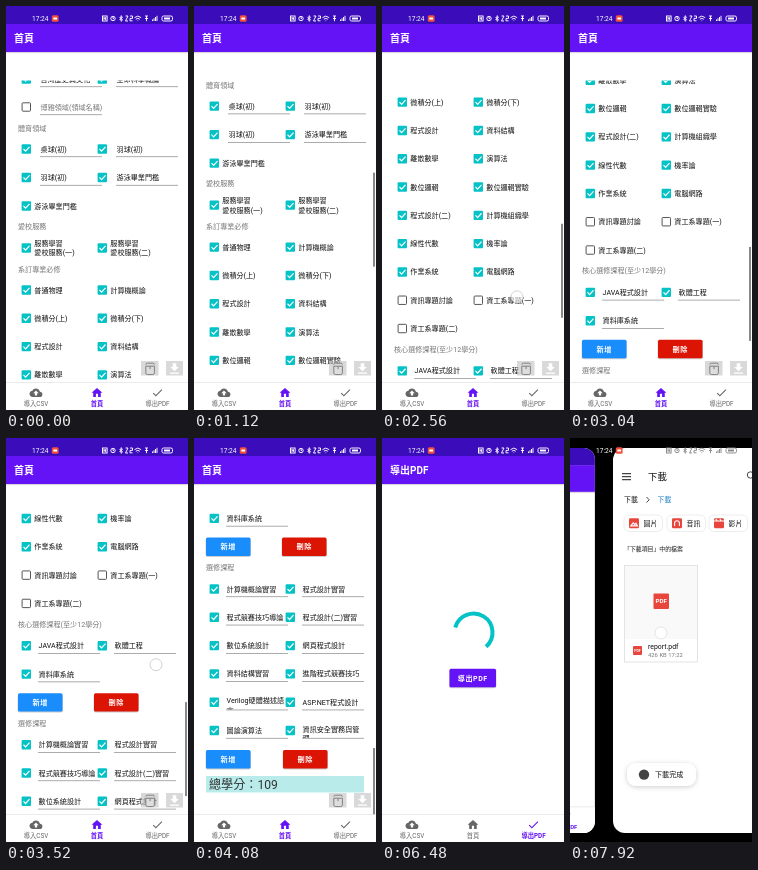
An HTML page that plays this animation: 182 by 404 pixels, repeating every 8000 ms.

```html
<!DOCTYPE html>
<html lang="zh-Hant">
<head>
<meta charset="utf-8">
<title>學分計算</title>
<style>
html, body { margin: 0; width: 100%; height: 100%; overflow: hidden; background: #000; }
svg { display: block; width: 100%; height: 100%; }
text { font-family: Roboto, "Noto Sans CJK TC", "Noto Sans CJK", sans-serif; white-space: pre; }
</style>
</head>
<body>
<svg id="stage" viewBox="0 0 182 404"></svg>
<script>
const TEAL = '#04c2c6', PURPLE = '#6412f6', GREY = '#666';
const LOOP = 8000, TAB_AT = 4400, LOAD_AT = 5500, LOADED_AT = 7080, SWITCH_AT = 7400, SWITCH_END = 7920;

const rect = (x, y, w, h, fill, extra = '') =>
  `<rect x="${x}" y="${y}" width="${w}" height="${h}" fill="${fill}" ${extra}/>`;
const path = (d, extra = '') => `<path d="${d}" ${extra}/>`;
const stroke = (color, width = 1) => `fill="none" stroke="${color}" stroke-width="${width}"`;
// y is the vertical middle of the line
const text = (x, y, s, size = 7.1, fill = '#111', extra = '') =>
  `<text x="${x}" y="${y + size * .36}" font-size="${size}" fill="${fill}" ${extra}>${s}</text>`;
const MID = 'text-anchor="middle"', BOLD = 'font-weight="700"';

// ---- course list, y measured from the first scroll position ----
function box(x, y, on) {
  return on
    ? rect(x - 4.4, y - 4.7, 9.4, 9.4, TEAL, 'rx="1"') + path(`M${x - 2.5} ${y}l2.1 2.2 3.9-4.3`, stroke('#fff', 1.2))
    : rect(x - 3.9, y - 4.2, 8.4, 8.4, '#fff', 'rx=".8" stroke="#555" stroke-width="1"');
}
function row(y, names, on = true) {
  return names.map((name, i) => {
    const x = 20 + 76 * i, lines = name.split('/');
    const shift = lines.length > 1 ? 4.7 : 0;
    return box(x, y, on) + lines.map((s, k) => text(x + 8.3, y - shift + k * 9.6, s)).join('');
  }).join('');
}
function field(y, names, inset = 12, on = true) {
  return names.map((name, i) => {
    const x = 20 + 76 * i, left = x + inset, [first, rest] = name.split('/');
    return box(x, y, on)
      + text(left + .6, y - (rest ? 1.5 : 0), first, 7.1, on ? '#111' : '#777')
      + (rest ? `<svg x="${left}" y="${y + 3}" width="62" height="4.6">${text(.6, 5, rest)}</svg>` : '')
      + rect(left, y + 7.4, 62, .7, '#888');
  }).join('');
}
const heading = (y, s) => text(12, y, s, 7.1, '#777');
const button = (x, y, w, fill, s, size) =>
  rect(x - .4, y - 8.5, w + .8, 18.7, '#000', 'rx="2" opacity=".2"') + rect(x, y - 9.2, w, 18.4, fill, 'rx="1.5"')
  + text(x + w / 2, y, s, size, '#fff', `${MID} ${BOLD} letter-spacing=".5"`);
const buttons = (y, x = 88) => button(12, y, 44.5, '#1a8dfc', '新增', 7.2) + button(x, y, 44.5, '#dc1404', '刪除', 7.2);

const list = [
  field(73, ['台灣歷史與文化', '生命科學概論'], 14),
  field(101, ['博雅領域(領域名稱)'], 14, false),
  heading(122, '體育領域'),
  field(143, ['桌球(初)', '羽球(初)'], 14),
  field(171.5, ['羽球(初)', '游泳畢業門檻'], 14),
  row(200, ['游泳畢業門檻']),
  heading(220.5, '愛校服務'),
  row(242, ['服務學習/愛校服務(一)', '服務學習/愛校服務(二)']),
  heading(263, '系訂專業必修'),
  ...[['普通物理', '計算機概論'], ['微積分(上)', '微積分(下)'], ['程式設計', '資料結構'],
    ['離散數學', '演算法'], ['數位邏輯', '數位邏輯實驗'], ['程式設計(二)', '計算機組織學'],
    ['線性代數', '機率論'], ['作業系統', '電腦網路'], ['資訊專題討論', '資工系專題(一)'],
    ['資工系專題(二)']].map((names, i) => row(284 + 28.3 * i, names, i < 8)),
  heading(559.5, '核心選修課程(至少12學分)'),
  field(581, ['JAVA程式設計', '軟體工程']),
  field(609.4, ['資料庫系統']),
  buttons(637.7),
  heading(658.8, '選修課程'),
  ...[['計算機概論實習', '程式設計實習'], ['程式競賽技巧導論', '程式設計(二)實習'],
    ['數位系統設計', '網頁程式設計'], ['資料結構實習', '進階程式競賽技巧'],
    ['Verilog硬體描述語/言', 'ASP.NET程式設計'], ['圖論演算法', '資訊安全實務與管/理']
  ].map((names, i) => field(680 + 28.3 * i, names)),
  buttons(850.3, 89),
  rect(12, 867, 158, 16.5, '#b9ebeb'),
  text(15, 875.3, '總學分：109', 12.1, '#333')
].join('');

// ---- fixed parts ----
const floating =
  rect(135, 355, 17.5, 14.5, '#bbb', 'opacity=".55"') + rect(160, 355, 17, 14.5, '#bbb', 'opacity=".55"')
  + path('M139.8 360.2h8.6v6.6q0 1.8-1.8 1.8h-5q-1.8 0-1.8-1.8zM139.8 358.6q0-1.4 1.6-1.4h5.4q1.6 0 1.6 1.4M144.1 360.5v2.6',
    'fill="#ddd" stroke="#777" stroke-width=".9"')
  + path('M166.7 357.2h3.6v3.8h2.4l-4.2 4.2-4.2-4.2h2.4zM164 366.4h9v1.4h-9z', 'fill="#fff"');

const NAV = [
  [30, '導入CSV', 'M19.35 10.04C18.67 6.59 15.64 4 12 4 9.11 4 6.6 5.64 5.35 8.04 2.34 8.36 0 10.91 0 14c0 3.31 2.69 6 6 6h13c2.76 0 5-2.24 5-5 0-2.64-2.05-4.78-4.65-4.96zM14 13v4h-4v-4H7l5-5 5 5h-3z'],
  [91, '首頁', 'M10 20v-6h4v6h5v-8h3L12 3 2 12h3v8z'],
  [151.5, '導出PDF', 'M9 16.17L4.83 12l-1.42 1.41L9 19 21 7l-1.41-1.41z']
];
const nav = active => rect(0, 376.5, 182, 27.5, '#fff') + rect(0, 376.3, 182, .6, '#ddd')
  + NAV.map(([x, s, d], i) => {
    const fill = i === active ? PURPLE : GREY;
    return path(d, `fill="${fill}" transform="translate(${x - 6.5} 380.3) scale(.54)"`)
      + text(x, 398, s, 6.3, fill, `${MID} ${i === active ? BOLD : ''}`);
  }).join('');
const page = (id, title, active, body) => `<g id="${id}">${body}${nav(active)}
  ${rect(0, 46, 182, 1.2, '#000', 'opacity=".15"')}${rect(0, 0, 182, 18.3, '#3b0cba')}
  ${rect(0, 18, 182, 28, PURPLE)}${text(8, 32.5, title, 10, '#fff', BOLD)}</g>`;

const statusIcons = `<g id="icons" fill="none" stroke-width=".95">
  <rect x="96.5" y="10" width="4.6" height="5"/><path d="M98 13.8v-2.4l1.6 2.2v-2.4"/>
  <circle cx="107" cy="12.5" r="2.2"/><path d="M107 11v1.6h1M113.5 11l3 3-1.5 1.3V9.7l1.5 1.3-3 3"/>
  <path d="M119.5 10h2.5l-2.5 5h2.5M124 10h2.5v2.4H124v2.4h2.5M128.5 11.6q3.3-3 6.6 0M129.8 13.2q2-1.6 4 0M131.8 14.5v.6"/>
  <path d="M139 10h3M140.5 10v5.2M139 12.5h3M146.5 15v-1.5M148 15v-2.7M149.5 15v-4M151 15v-5.2"/>
  <rect x="156" y="10" width="10.5" height="5" rx="1.6"/><path d="M158 12.5h6" stroke-width="2"/></g>`;

// ---- downloads screen, placed at its resting position ----
const RED = '#e8453c';
const chip = (x, s, glyph) => rect(x, 77, 38.5, 16.5, '#fff', 'rx="5" stroke="#e6e6e6" stroke-width=".7"')
  + rect(x + 5, 80.3, 10, 10, RED, 'rx="1.3"') + path(`M${x + 10} 85.3${glyph}`, stroke('#fff', 1.1))
  + text(x + 19.5, 85.3, s, 6.9);
const pdfIcon = (x, y, size) => rect(x, y, size, size, RED, 'rx="1"')
  + text(x + size / 2, y + size / 2, 'PDF', size * .4, '#fff', `${MID} ${BOLD}`);
const files = rect(43, 10, 174, 385, '#fff', 'rx="12"')
  + path('M52 35.6h9M52 38.6h9M52 41.6h9', stroke('#444', 1.1))
  + text(78, 38.3, '下載', 9.4)
  + `<circle cx="180.5" cy="37" r="3.2" ${stroke('#444', 1)}/>` + path('M183 39.5l3 3', stroke('#444', 1))
  + text(54, 61.8, '下載', 6.9) + path('M76.5 59l2.7 2.8-2.7 2.8', stroke('#444', 1))
  + text(87.5, 61.8, '下載', 6.9, '#1b7fc4')
  + chip(54, '圖片', 'm-3.2 2.6l2.4-3 1.6 1.8 1.2-1.4 1.6 2.6z') + chip(97, '音訊', 'm-2.4 2.8v-3a2.4 2.4 0 0 1 4.8 0v3')
  + chip(139, '影片', 'm-5-2.3h10m-8-2l1 2m3-2l1 2')
  + text(54, 110.8, '「下載項目」中的檔案', 5.9)
  + rect(54.5, 127.5, 73, 96.5, '#fff', 'stroke="#ddd" stroke-width=".8"') + rect(55, 128, 72, 73, '#f9f9f9')
  + pdfIcon(83.5, 155.5, 15.5) + pdfIcon(63, 208, 9)
  + text(78, 209, 'report.pdf', 6.9) + text(78, 217.3, '426 KB 17:22', 5.9, '#777')
  + `<circle cx="91" cy="195" r="6" fill="#fff" stroke="#ddd" stroke-width=".8"/>`;

const $ = id => document.getElementById(id);
$('stage').innerHTML = `
<defs>
  <clipPath id="card"><rect id="corner" width="182" height="404"/></clipPath>
  <clipPath id="view"><rect y="74.5" width="182" height="303"/></clipPath>
  <filter id="shadow" x="-30%" y="-60%" width="160%" height="220%"><feDropShadow dx="0" dy="1" stdDeviation="2.5" flood-opacity=".2"/></filter>
</defs>
${rect(0, 0, 182, 404, '#000')}
<g id="app"><g clip-path="url(#card)">${rect(0, 0, 182, 404, '#fff')}
  ${page('home', '首頁', 1, `<g clip-path="url(#view)"><g id="list">${list}</g></g>
    ${rect(179, 0, 2, 94, '#888', 'id="bar"')}${floating}`)}
  ${page('export', '導出PDF', 2, path('', `id="spin" ${stroke(TEAL, 4)}`)
    + button(67.5, 240, 46.5, PURPLE, '導出PDF', 7.1))}
</g></g>
<g id="files">${files}</g>
<g id="toast"><rect x="57" y="325" width="69" height="23" rx="9" fill="#fff" filter="url(#shadow)"/>
  <circle cx="74" cy="336.6" r="5.2" fill="#444"/>${text(85, 336.7, '下載完成', 7.1)}</g>
${text(26, 12.6, '17:24', 6.6, '#fff')}${rect(45.8, 9.3, 6.8, 6.4, '#f0503c', 'rx="1.5"')}
${rect(47.3, 11.4, 3.8, 2.2, '#fff', 'rx=".6"')}${statusIcons}
<circle id="touch" r="6" fill="#fff" fill-opacity=".6" stroke="#ccc" stroke-width=".9"/>`;

const SCROLL = [[0, 0], [500, 0], [1920, 98], [2560, 216], [3520, 373], [4080, 529], [LOOP, 529]];
const TOUCHES = [[1920, 133, 282], [2560, 135, 291], [3520, 150, 227]];

const clamp = v => Math.min(1, Math.max(0, v));
const ramp = (t, a, b) => clamp((t - a) / (b - a));
const smooth = v => v * v * (3 - 2 * v);
const show = (id, on) => $(id).setAttribute('display', on ? 'inline' : 'none');
const move = (id, x, y, s = 1) => $(id).setAttribute('transform', `translate(${x} ${y}) scale(${s})`);

function scrollAt(t) {
  const i = SCROLL.findIndex(p => p[0] > t), [t0, y0] = SCROLL[i - 1], [t1, y1] = SCROLL[i];
  return y0 + (y1 - y0) * ramp(t, t0, t1);
}

function spinner(t) {
  const u = (t - 6480) / 1333 + 1.33, n = Math.floor(u), f = u - n;
  const turn = -2 + 216 * u + 270 * n;
  const point = deg => {
    const a = deg * Math.PI / 180;
    return `${91.5 + 19 * Math.cos(a)} ${194.5 + 19 * Math.sin(a)}`;
  };
  const tail = 270 * smooth(clamp(2 * f - 1)), head = 15 + 270 * smooth(clamp(2 * f));
  return `M${point(turn + tail)}A19 19 0 ${head - tail > 180 ? 1 : 0} 1 ${point(turn + head)}`;
}

function draw(t) {
  const y = scrollAt(t);
  show('home', t < TAB_AT);
  show('export', t >= TAB_AT);
  move('list', 0, -y);
  move('bar', 0, 154 + y * .295);
  $('bar').setAttribute('opacity', ramp(t, 400, 600));

  const touch = TOUCHES.find(p => Math.abs(t - p[0]) < 240);
  show('touch', touch);
  if (touch) move('touch', touch[1], touch[2] - y + scrollAt(touch[0]));

  show('spin', t >= LOAD_AT && t < LOADED_AT);
  $('spin').setAttribute('d', spinner(Math.max(t, LOAD_AT)));
  $('toast').setAttribute('opacity', ramp(t, LOADED_AT, LOADED_AT + 160));

  const p = smooth(ramp(t, SWITCH_AT, SWITCH_END)), lift = clamp(p * 3);
  const scale = 1 - .047 * lift;
  move('app', 9 * lift * (1 - p) / 2 - 148.5 * p, 10 * lift, scale);
  $('corner').setAttribute('rx', 12 * lift);
  show('files', p > 0);
  move('files', 157 * (1 - p), 0);
  $('icons').setAttribute('stroke', p > .5 ? '#888' : '#fff');
}

const start = performance.now();
(function tick() {
  draw((performance.now() - start) % LOOP);
  requestAnimationFrame(tick);
})();
</script>
</body>
</html>
```
